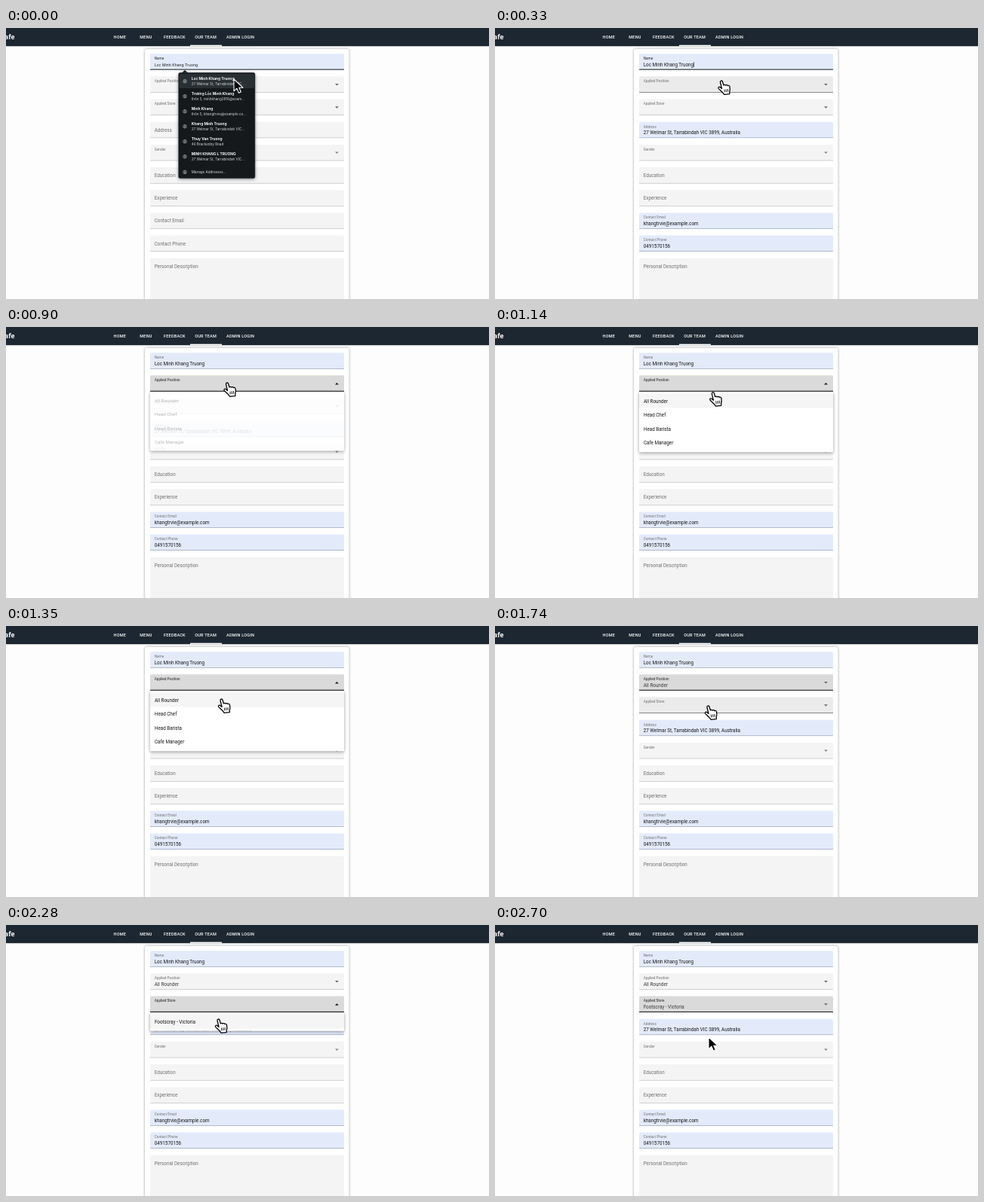
These frames come from a looping animation (640x360 px, 2.73 s). An HTML page:

```html
<!DOCTYPE html>
<html lang="en">
<head>
<meta charset="utf-8">
<title>Job application form</title>
<style>
  html, body { margin: 0; width: 100%; height: 100%; overflow: hidden; background: #fdfdfd; }
  svg { display: block; width: 640px; height: 360px; font: 6.3px Roboto, sans-serif; }
  text { white-space: pre; }
  .nav { font-size: 5.5px; font-weight: 500; letter-spacing: .22px; fill: #fff; }
  .brand { font: bold 8.5px "Open Sans", sans-serif; fill: #fff; text-anchor: end; }
  .label { fill: #717171; }
  .small { font-size: 4.7px; fill: #707070; }
  .dark { fill: #222; }
  .value { fill: #161616; }
  .picked { fill: #3a3a3a; }
  .preview { font: 5.1px Inter, sans-serif; fill: #161616; }
  .who { font: bold 4.9px Inter, sans-serif; fill: #f4f4f4; }
  .where { font: 4.6px Inter, sans-serif; fill: #d6d8da; }
  .card { filter: drop-shadow(0 .5px 1.5px #0006); }
  .drop { filter: drop-shadow(0 1.5px 2px #0006); }
  .bar { filter: drop-shadow(0 .5px 1px #0007); }
</style>
</head>
<body>
<svg id="stage" viewBox="0 0 640 360"></svg>
<script>
const LOOP = 2730;
const FILL = 150, OPEN_POS = 840, PICK_POS = 1530, OPEN_STORE = 1990, PICK_STORE = 2430;
const NAME = 'Loc Minh Khang Truong';
const STREET = '27 Welmar St, Tarrabindah VIC';
const LEFT = 191, WIDTH = 257, PITCH = 30.17;
const BLUE = '#e3ebfb', PLAIN = '#f4f4f4', HOVER = '#ebebeb', FOCUS = '#dadada';

const rowTop = i => 34.2 + i * PITCH;
const rect = (x, y, w, h, fill, extra = '') =>
  `<rect x="${x}" y="${y}" width="${w}" height="${h}" fill="${fill}" ${extra}/>`;
const text = (x, y, str, cls) => `<text x="${x}" y="${y}" class="${cls}">${str}</text>`;
// Wraps content that is visible only between two times.
const during = (from, to, content) => `<g data-from="${from}" data-to="${to}">${content}</g>`;

function box(i, fill, line, thick, h = 21.4) {
  const y = rowTop(i);
  return rect(LEFT, y, WIDTH, h, fill, 'rx="1.5"') +
    rect(LEFT, y + h - thick, WIDTH, thick, line);
}
const plain = i => box(i, PLAIN, '#a9a9a9', .5);
const blue = i => box(i, BLUE, '#8d95a5', .6);
const hovered = i => box(i, HOVER, '#444', .6);
const focused = i => box(i, FOCUS, '#111', 1);
const bigLabel = (i, str) => text(196.7, rowTop(i) + 13, str, 'label');
const smallLabel = (i, str, cls = '') => text(196.7, rowTop(i) + 7.9, str, 'small ' + cls);
const value = (i, str, cls = 'value') => text(196.7, rowTop(i) + 16.7, str, cls);

function arrow(i, up, fill = '#666') {
  const y = rowTop(i) + 10.9, d = up ? -1.2 : 1.2;
  return `<path d="M436 ${y - d}h4.8l-2.4 ${2 * d}z" fill="${fill}"/>`;
}

function autofilled(i, label, str) {
  return during(0, FILL, plain(i) + bigLabel(i, label)) +
    during(FILL, LOOP, blue(i) + smallLabel(i, label) + value(i, str));
}

function select(i, label, str, hover, open, pick, blur) {
  const rest = plain(i) + smallLabel(i, label) + arrow(i, false);
  return during(0, hover, rest) +
    during(hover, open, hovered(i) + smallLabel(i, label) + arrow(i, false)) +
    during(open, blur, focused(i) + smallLabel(i, label, 'dark')) +
    during(open, pick, arrow(i, true, '#111')) +
    during(pick, blur, arrow(i, false)) +
    during(blur, LOOP, rest) +
    during(pick, LOOP, value(i, str, 'picked'));
}

function panel(id, i, options, hoverAt, pick) {
  const h = 6 + options.length * 18.6;
  return `<g id="${id}" transform-origin="0 ${rowTop(i) + 21.6}"><g class="drop">` +
    rect(LEFT, rowTop(i) + 21.6, WIDTH, h, '#fff', 'rx="1.5"') + '</g>' +
    during(hoverAt, pick + 100, rect(LEFT, rowTop(i) + 24.6, WIDTH, 18.6, '#f5f5f5')) +
    '<g class="options">' +
    options.map((o, k) => text(196.9, rowTop(i) + 36.2 + k * 18.6, o, 'value')).join('') +
    '</g></g>';
}

function suggestions() {
  const people = [
    [NAME, STREET + '...'],
    ['Trương Lộc Minh Khang', 'thôn 5, minhkhang2816@exam...'],
    ['Minh Khang', 'thôn 5, khangtrvie@example.co...'],
    ['Khang Minh Truong', STREET + '...'],
    ['Thuy Van Truong', '46 Brackenby Road'],
    ['MINH KHANG L TRUONG', STREET + '...']
  ];
  const icon = y => `<g fill="none" stroke="#c4c7ca" stroke-width=".6"><circle cx="237" cy="${y}" r="2.3"/>` +
    `<circle cx="237" cy="${y - .5}" r=".7"/><path d="M235.5 ${y + 1.5}q1.5-1.3 3 0"/></g>`;
  return '<g class="drop"><path d="M232.5 60l4.5-4 4.5 4z" fill="#15191c"/>' +
    rect(228.5, 59.3, 101.5, 140.5, '#15191c', 'rx="2.5" stroke="#4a4e52" stroke-width=".5"') + '</g>' +
    rect(229.5, 61, 99.5, 19, '#293034', 'rx="2"') +
    people.map(([who, where], k) => {
      const y = 67.5 + k * 20;
      return icon(y + 3.2) + text(245.7, y + 1.7, who, 'who') + text(245.7, y + 8.9, where, 'where');
    }).join('') +
    icon(191.4) + text(245.7, 193.2, 'Manage Addresses...', 'where');
}

const menu = [[142.5, 'HOME'], [177.3, 'MENU'], [209, 'FEEDBACK'], [250.3, 'OUR TEAM'], [292, 'ADMIN LOGIN']];
const nav = '<g class="bar">' + rect(0, -5, 640, 29, '#1d2731') + '</g>' +
  text(11.5, 14.7, 'Cafe', 'brand') +
  menu.map(([x, str]) => text(x, 13.8, str, 'nav')).join('') +
  rect(244, 22.6, 42, 1.4, '#fff');

const nameField =
  during(0, OPEN_POS, box(0, BLUE, '#16181c', 1) + smallLabel(0, 'Name', 'dark')) +
  during(OPEN_POS, LOOP, blue(0) + smallLabel(0, 'Name')) +
  during(0, FILL, value(0, NAME, 'preview')) +
  during(FILL, LOOP, value(0, NAME)) +
  during(FILL, 650, '<path id="caret" d="M0 45v6.8" stroke="#111" stroke-width=".6"/>');

const pointers =
  `<g id="arrow"><path d="M.7.7V16.5L4.6 12.9 7.2 18.9 10 17.7 7.5 11.9H12.6Z" fill="#000" stroke="#fff"
    stroke-width="1.1" stroke-linejoin="round" transform="translate(-.7 -.7)"/></g>
  <g id="hand"><g transform="translate(-4.6 -1)" fill="#fff" stroke="#000" stroke-width="1.3" stroke-linejoin="round">
    <path d="M5.6 11.5L3.6 3C3.2.8 6 .2 6.6 2.3L8 7C8.6 6 10.3 6.1 10.7 7.2 11.5 6.2 13.1 6.5 13.4 7.7
      14.6 6.9 15.9 7.6 16.1 8.9 16.6 11.3 17 13 15.9 15.6V18.6L8.6 19.4C8 17.5 4.5 14.6 1.4 11.6 .2 10 2 8.6 3.3 9.5Z"/>
    <path d="M9 12.6l.4 3.8M11.3 12.3l.3 3.8M13.6 12l.1 3.8" stroke-width=".9"/></g></g>`;

const stage = document.getElementById('stage');
stage.innerHTML =
  '<g class="card">' + rect(184, 28, 270.5, 400, '#fff', 'rx="2.5"') + '</g>' + nav + nameField +
  select(1, 'Applied Position', 'All Rounder', FILL, OPEN_POS, PICK_POS, OPEN_STORE) +
  select(2, 'Applied Store', 'Footscray - Victoria', 1620, OPEN_STORE, PICK_STORE, LOOP) +
  autofilled(3, 'Address', STREET + ' 3899, Australia') +
  plain(4) + smallLabel(4, 'Gender') + arrow(4, false, '#858585') +
  plain(5) + bigLabel(5, 'Education') +
  plain(6) + bigLabel(6, 'Experience') +
  autofilled(7, 'Contact Email', 'khangtrvie@example.com') +
  autofilled(8, 'Contact Phone', '0491570156') +
  box(9, PLAIN, '#a9a9a9', .5, 80) + bigLabel(9, 'Personal Description') +
  panel('positions', 1, ['All Rounder', 'Head Chef', 'Head Barista', 'Cafe Manager'], 1140, PICK_POS) +
  panel('stores', 2, ['Footscray - Victoria'], 2200, PICK_STORE) +
  during(0, FILL, suggestions()) + pointers;

const find = id => document.getElementById(id);
const timed = [...stage.querySelectorAll('[data-from]')];
const show = (el, on) => { el.style.display = on ? '' : 'none'; };
const clamp = v => Math.min(1, Math.max(0, v));

// Pointer tip: time, x, y
const path = [
  [0, 302, 68], [180, 302, 68.5], [330, 299.5, 70], [780, 292.8, 74], [900, 292.5, 74],
  [1350, 285, 97], [1530, 284.5, 98.5], [1740, 282, 106], [1990, 282, 108],
  [2280, 281, 125], [2430, 281, 126.5], [2700, 283, 149], [LOOP, 283, 149.5]
];

function pointerAt(t) {
  const k = path.findIndex(p => p[0] > t);
  const [t0, x0, y0] = path[k - 1], [t1, x1, y1] = path[k];
  const u = (t - t0) / (t1 - t0), e = u * u * (3 - 2 * u);
  return [x0 + (x1 - x0) * e, y0 + (y1 - y0) * e];
}

function drawPanel(id, open, pick, t) {
  const el = find(id), p = 1 - (1 - clamp((t - open) / 120)) ** 3;
  show(el, t >= open && t < pick + 100);
  el.setAttribute('transform', `scale(1 ${.8 + .2 * p})`);
  el.setAttribute('opacity', p * (1 - clamp((t - pick) / 100)));
  el.querySelector('.options').setAttribute('opacity', clamp((t - open - 30) / 90));
}

function render(t) {
  for (const el of timed) show(el, t >= +el.dataset.from && t < +el.dataset.to);
  drawPanel('positions', OPEN_POS, PICK_POS, t);
  drawPanel('stores', OPEN_STORE, PICK_STORE, t);
  const [x, y] = pointerAt(t), hand = t >= FILL && t < 2530;
  for (const id of ['arrow', 'hand']) {
    show(find(id), (id === 'hand') === hand);
    find(id).setAttribute('transform', `translate(${x} ${y})`);
  }
}

const typed = [...stage.querySelectorAll('.value')].find(el => el.textContent === NAME);
typed.parentNode.style.display = '';
find('caret').setAttribute('transform', `translate(${197.2 + typed.getComputedTextLength()} 0)`);

const start = performance.now();
function tick() {
  render((performance.now() - start) % LOOP);
  requestAnimationFrame(tick);
}
tick();
</script>
</body>
</html>
```
